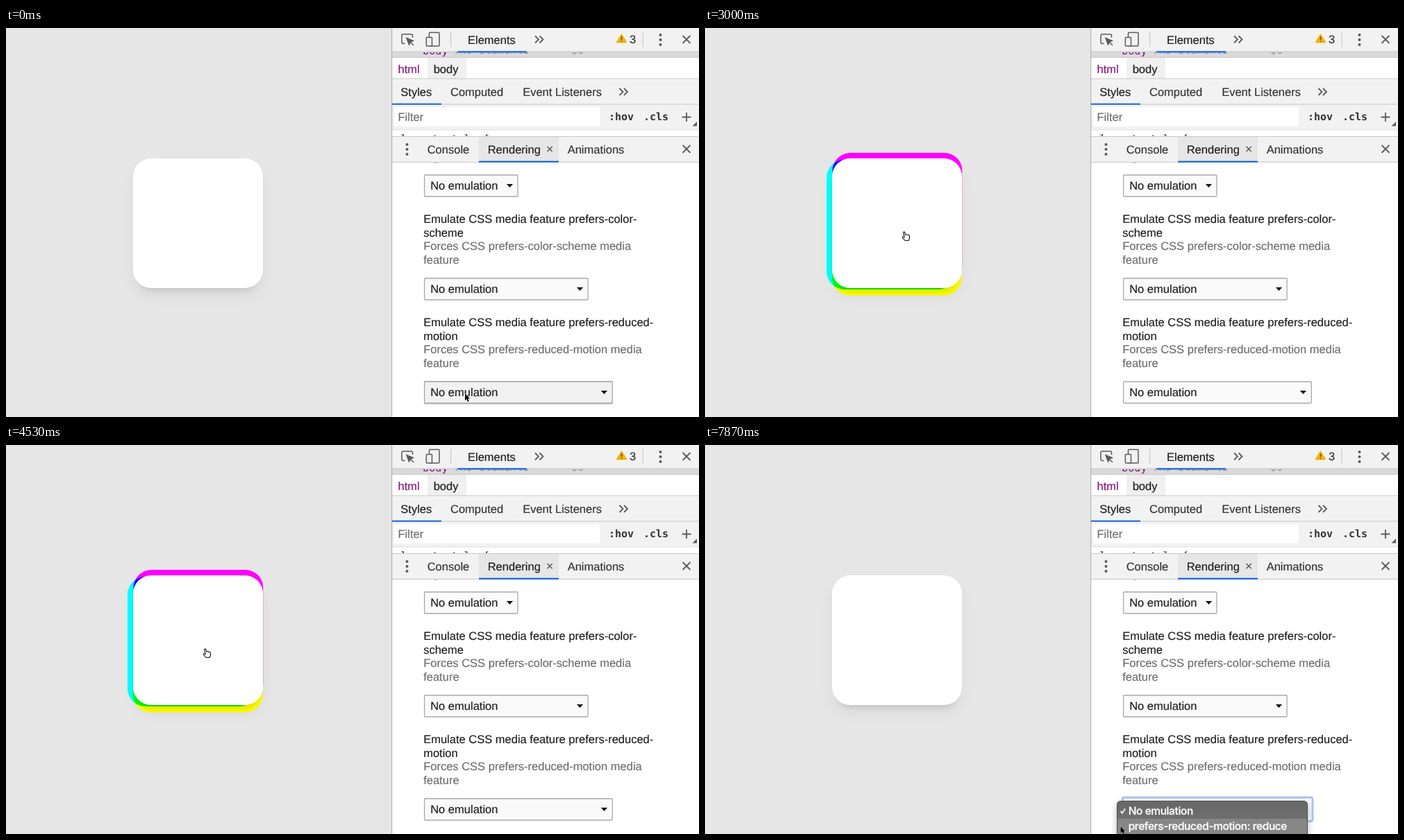
Write an HTML page that moves like this. It is 998 px wide and 561 px high and loops after 8 s.

```html
<!DOCTYPE html>
<html lang="en">
<head>
<meta charset="utf-8">
<title>Reduced motion emulation</title>
<style>
html, body { margin: 0; width: 100%; height: 100%; overflow: hidden; background: #e6e6e6; }
svg { position: absolute; left: 0; top: 0; display: block; color: #333; }
text { font: 16.5px "Liberation Sans", Arial, sans-serif; fill: currentColor; stroke: currentColor; stroke-width: .18px;
  text-rendering: geometricPrecision; white-space: pre; }
.dark { color: #1d1e21; }
.dim { color: #6e6e6e; }
.tag { color: #881280; }
.mono { font: 15.2px "DejaVu Sans Mono", monospace; stroke: none; }
.bold { font-weight: 700; font-size: 15px; }
.menu text { font: 500 15.4px Inter, sans-serif; letter-spacing: -.35px; color: #fff; stroke-width: .25px; }
.line { fill: none; stroke: #5a5a5a; stroke-width: 1.8; }
.thin { stroke-width: 1.5; }
.blue { fill: #1a66dc; }
.rule { fill: #c9c9c9; }
.box { fill: #fafafa; stroke: #a9a9a9; stroke-width: 1.3; }

.card { position: absolute; left: 183px; top: 187.7px; width: 187.3px; height: 187.3px; isolation: isolate; }
.card i { position: absolute; inset: 0; border-radius: 26px; mix-blend-mode: multiply; animation: spread 8s infinite; }
.card b { position: absolute; inset: 0; border-radius: 26px; background: #fff;
  box-shadow: 0 12px 22px -3px rgba(0,0,0,.065), 0 11px 10px -8px rgba(0,0,0,.11); }

@keyframes spread {
  0%, 20.3% { transform: none; opacity: 0; animation-timing-function: ease-out; }
  20.4% { opacity: 1; }
  22.2%, 61.3% { transform: translate(var(--x), var(--y)); animation-timing-function: ease-out; }
  63.1% { opacity: 1; }
  63.2%, 100% { transform: none; opacity: 0; }
}
.pointer { animation: travel 8s infinite; }
@keyframes travel {
  0%, 1.6% { transform: translate(661px, 527px); animation-timing-function: ease-in-out; }
  8.4%, 10.9% { transform: translate(648px, 521px); animation-timing-function: ease-in; }
  20% { transform: translate(378px, 280px); animation-timing-function: ease-out; }
  23.75%, 56.75% { transform: translate(287px, 294px); animation-timing-function: cubic-bezier(.3,0,.7,.7); }
  64.4% { transform: translate(458px, 372px); animation-timing-function: linear; }
  69.1% { transform: translate(585px, 468px); animation-timing-function: ease-out; }
  73.1% { transform: translate(640px, 546px); animation-timing-function: ease-in-out; }
  75% { transform: translate(630px, 531px); animation-timing-function: ease-in-out; }
  78.4%, 81.6% { transform: translate(622px, 529px); animation-timing-function: ease-in-out; }
  84.1%, 94.1% { transform: translate(635px, 548px); animation-timing-function: ease-in-out; }
  98.3%, 100% { transform: translate(598.5px, 550px); }
}
.arrow { animation: arrow 8s step-end infinite; }
@keyframes arrow { 0% { opacity: 1; } 20.4% { opacity: 0; } 61.3% { opacity: 1; } }
.hand { animation: hand 8s step-end infinite; }
@keyframes hand { 0% { opacity: 0; } 20.4% { opacity: 1; } 61.3% { opacity: 0; } }
.hover { animation: hover 8s step-end infinite; }
@keyframes hover { 0% { opacity: 1; } 12.5% { opacity: 0; } 71.3% { opacity: 1; } 89.2% { opacity: 0; } }
.ring { animation: ring 8s step-end infinite; }
@keyframes ring { 0% { opacity: 0; } 89.2% { opacity: 1; } }
.menu { filter: drop-shadow(0 3px 5px rgba(0,0,0,.28)); animation: menu 8s step-end infinite; }
@keyframes menu { 0% { opacity: 0; } 81.7% { opacity: 1; } }
.lit { animation: lit 8s step-end infinite; }
@keyframes lit { 0% { transform: translateY(-22px); } 83.2% { transform: none; } }
</style>
</head>
<body>
<div class="card">
  <i style="background:#0ff;--x:-8px;--y:2px"></i>
  <i style="background:#f0f;--x:.5px;--y:-8px"></i>
  <i style="background:#ff0;--x:-.2px;--y:10.8px"></i>
  <b></b>
</div>

<svg width="998" height="561" viewBox="0 0 998 561">
  <defs>
    <clipPath id="node"><rect x="556" y="35" width="442" height="7"/></clipPath>
    <clipPath id="rules"><rect x="556" y="147" width="442" height="9"/></clipPath>
    <path id="more" class="line" d="M0 0l5 5-5 5M6.5 0l5 5-5 5"/>
    <path id="close" class="line" d="M-5.5-5.5l11 11M5.5-5.5l-11 11"/>
    <path id="drop" fill="#111" d="M-4.6-2.4h9.2L0 2.6z"/>
    <g id="dots" fill="#5a5a5a"><circle cy="-7" r="2"/><circle r="2"/><circle cy="7" r="2"/></g>
    <linearGradient id="shade" x2="0" y2="1">
      <stop offset="0" stop-color="#686868"/><stop offset="1" stop-color="#767676"/>
    </linearGradient>
  </defs>

  <!-- panel backgrounds -->
  <rect x="556" width="442" height="561" fill="#fff"/>
  <rect x="556" width="442" height="34" fill="#f2f2f2"/>
  <rect x="556" y="34" width="442" height="8" fill="#dadada"/>
  <g clip-path="url(#node)">
    <text class="mono tag" x="600" y="37.5">body</text>
    <g class="dim" opacity=".7">
      <text class="mono" x="644" y="37">.no-elements  ==</text>
      <text class="mono" x="814" y="37">$0</text>
    </g>
  </g>
  <rect x="607" y="43" width="56" height="30" fill="#f0f0f0"/>
  <rect x="556" y="73" width="442" height="74" fill="#f2f2f2"/>
  <rect x="559" y="114" width="296" height="28" fill="#fff"/>
  <g clip-path="url(#rules)"><text class="mono" x="559" y="165.3">element.style {</text></g>
  <rect x="556" y="157" width="442" height="36" fill="#f2f2f2"/>
  <rect x="681" y="157" width="115" height="36" fill="#e6e6e6"/>
  <g class="rule">
    <rect x="556" y="33.5" width="442" height="1"/>
    <rect x="556" y="42" width="442" height="1"/>
    <rect x="556" y="72.5" width="442" height="1"/>
    <rect x="556" y="109.5" width="442" height="1"/>
    <rect x="556" y="146.5" width="442" height="1" fill="#e0e0e0"/>
    <rect x="556" y="156" width="442" height="1"/>
    <rect x="556" y="193" width="442" height="1"/>
    <rect x="640" y="6" width="1.2" height="21"/>
    <rect x="916.5" y="6" width="1.2" height="21"/>
    <rect x="555" width="1.2" height="561" fill="#b5b5b5"/>
  </g>
  <g class="blue">
    <rect x="650" y="33.3" width="100" height="2.2"/>
    <rect x="556" y="108.7" width="71" height="2"/>
    <rect x="681" y="191.7" width="115" height="2.2"/>
  </g>

  <!-- icons -->
  <g class="line thin">
    <path d="M574.5 22.5H572q-2 0-2-2V11q0-2 2-2h11.5q2 0 2 2v3"/>
    <path d="M577 14.5l3.4 9.500 2-3.800 3.800-1.800z" fill="#5a5a5a"/>
    <path d="M581.5 19.5l5.500 5.500"/>
    <rect x="609.5" y="6.500" width="14.500" height="19.500" rx="1"/>
    <rect x="605.3" y="13.500" width="8.200" height="12.500" rx="1" fill="#f2f2f2"/>
  </g>
  <path d="M886.5 9.500l6.600 11h-13.200z" fill="#f0b50a" stroke="#f0b50a" stroke-width="2" stroke-linejoin="round"/>
  <path d="M886.5 12.500v4.500M886.500 18.400v1.600" stroke="#6b4b00" stroke-width="1.7"/>
  <use href="#more" x="762" y="11.5"/>
  <use href="#more" x="883.5" y="87"/>
  <use href="#dots" x="942.5" y="17"/>
  <use href="#dots" x="577.5" y="175"/>
  <use href="#close" x="980" y="16.5"/>
  <use href="#close" x="980" y="174.5"/>
  <path class="line" d="M973.5 128.500h13M980 122v13"/>
  <path d="M995 135v6.500h-6.500z" fill="#5a5a5a"/>
  <path class="line thin" d="M779.5 171l7.200 7.200M786.700 171l-7.200 7.200"/>

  <!-- labels -->
  <text class="dark" x="665" y="22.7">Elements</text>
  <text x="898" y="22.3">3</text>
  <text class="tag" x="564.5" y="64.7">html</text>
  <text class="dark" x="615.7" y="64.7">body</text>
  <text class="dark" x="568.3" y="98">Styles</text>
  <text x="640" y="98">Computed</text>
  <text x="744.2" y="98">Event Listeners</text>
  <text class="dim" x="564.5" y="134">Filter</text>
  <text class="mono bold" x="868" y="133">:hov</text>
  <text class="mono bold" x="918" y="133">.cls</text>
  <text x="606.7" y="180.7">Console</text>
  <text class="dark" x="693.7" y="180.7">Rendering</text>
  <text x="808.7" y="180.7">Animations</text>
  <rect x="617" y="194" width="3" height="1" fill="#aaa"/>

  <g class="dark">
    <text x="601.2" y="281">Emulate CSS media feature prefers-color-</text>
    <text x="601.2" y="300.5">scheme</text>
    <text x="601.2" y="430">Emulate CSS media feature prefers-reduced-</text>
    <text x="601.2" y="449.5">motion</text>
  </g>
  <g class="dim">
    <text x="601.2" y="320">Forces CSS prefers-color-scheme media</text>
    <text x="601.2" y="339.7">feature</text>
    <text x="601.2" y="469">Forces CSS prefers-reduced-motion media</text>
    <text x="601.2" y="488.7">feature</text>
  </g>

  <!-- selects -->
  <rect class="box" x="602.6" y="212" width="134.300" height="31" rx="1"/>
  <rect class="box" x="602.6" y="361" width="235.500" height="31" rx="1"/>
  <rect class="box" x="602.6" y="510" width="270.700" height="31" rx="1"/>
  <g class="hover">
    <rect x="602" y="541.5" width="272" height="1.800" rx="1" fill="#000" opacity=".13"/>
    <rect class="box" x="602.6" y="510" width="270.700" height="31" rx="1" style="fill:#f2f2f2"/>
  </g>
  <rect class="ring" x="601.3" y="508.300" width="273.700" height="34.200" rx="2.500" fill="#fafafa" stroke="#aec5f3" stroke-width="3"/>
  <g class="dark">
    <text x="611.2" y="233">No emulation</text>
    <text x="611.2" y="382">No emulation</text>
    <text x="611.2" y="531">No emulation</text>
  </g>
  <use href="#drop" x="725.5" y="227.500"/>
  <use href="#drop" x="826.5" y="376.500"/>
  <use href="#drop" x="861.5" y="525.500"/>

  <!-- popup -->
  <g class="menu">
    <rect x="593.5" y="513.500" width="274" height="60" rx="5" fill="url(#shade)" stroke="#505050"/>
    <rect class="lit" x="594" y="539" width="273" height="22" fill="#868686"/>
    <path d="M598.5 528l2.300 3 4.200-6.500" fill="none" stroke="#fff" stroke-width="1.6"/>
    <text x="609.7" y="532.5">No emulation</text>
    <text x="609.7" y="554.5">prefers-reduced-motion: reduce</text>
  </g>

  <!-- pointer -->
  <g class="pointer">
    <path class="arrow" d="M0 0V10.300L2.300 8.100 4 12 5.800 11.200 4.200 7.500H7.300z" fill="#000" stroke="#fff" stroke-width="1" paint-order="stroke" stroke-linejoin="round"/>
    <path class="hand" d="M-1.300 1Q-.8-.8.500.3L2 4.200Q3 3.200 4 4.300 5 3.500 5.800 4.700 7.300 4.300 7.600 6.200L7.400 9.500 6.200 12.500H1L-2.600 8.300Q-3 6.800-1.500 7L.300 7.800z" fill="#fff" stroke="#111" stroke-width="1.1" stroke-linejoin="round"/>
  </g>
</svg>
</body>
</html>
```
